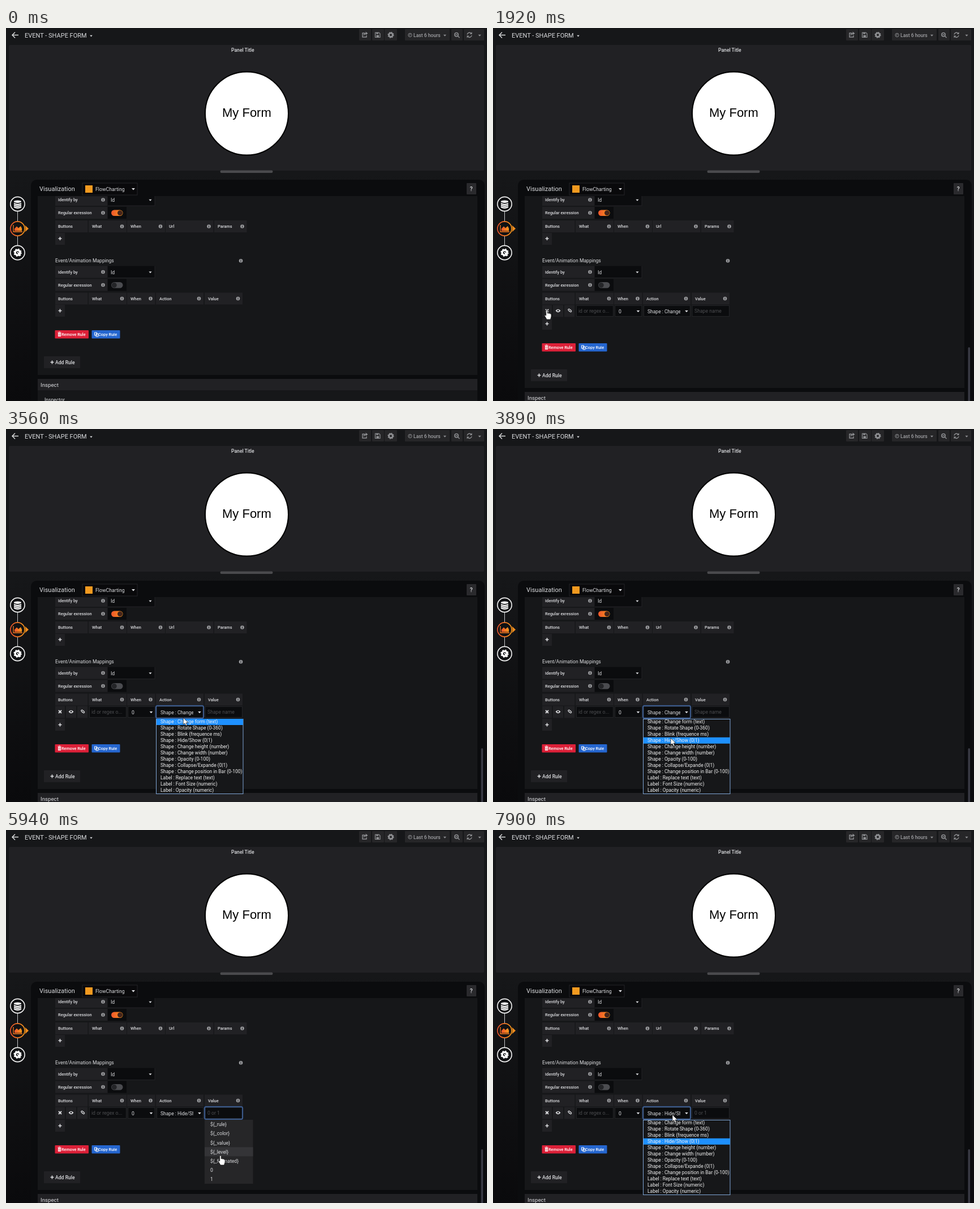
Write an HTML page that moves like this. It is 850 px wide and 659 px high and loops after 8000 ms.

```html
<!DOCTYPE html>
<html lang="en">
<head>
<meta charset="utf-8">
<title>Event mapping editor</title>
<style>
html, body { margin: 0; width: 100%; height: 100%; overflow: hidden; background: #161719; }
svg { display: block; width: 850px; height: 659px; font-family: Roboto, sans-serif; }
</style>
</head>
<body>
<svg id="stage" viewBox="0 0 850 659"></svg>
<script>
const LOOP = 8000, ROW_HEIGHT = 23;
const CELL = '#212124', DARK = '#0b0c0e', BODY = '#161719', TEXT = '#dcdde0', MUTED = '#8e8f92';
const stage = document.getElementById('stage');

// Drawing helpers: each returns markup; text is centred vertically on y.
const rect = (x, y, w, h, fill, extra = '') =>
  `<rect x="${x}" y="${y}" width="${w}" height="${h}" fill="${fill}" ${extra}/>`;
const path = (d, fill, extra = '') => `<path d="${d}" fill="${fill}" ${extra}/>`;
const line = (d, stroke, width = 1) => path(d, 'none', `stroke="${stroke}" stroke-width="${width}"`);
const circle = (x, y, r, fill, extra = '') => `<circle cx="${x}" cy="${y}" r="${r}" fill="${fill}" ${extra}/>`;
const text = (x, y, str, size = 8.66, fill = TEXT, extra = '') =>
  `<text x="${x}" y="${y + size * 0.355}" font-size="${size}" fill="${fill}" ${extra}>${str}</text>`;
const bold = (x, y, str, size = 7.45, fill = TEXT) => text(x, y, str, size, fill, 'font-weight="500"');
const group = (id, content, extra = '') => `<g id="${id}" ${extra}>${content}</g>`;
const at = (x, y, content) => `<g transform="translate(${x} ${y})">${content}</g>`;

const caret = (x, y, size = 2.6, fill = TEXT) =>
  path(`M${x - size} ${y - size / 2}h${2 * size}l${-size} ${size * 1.15}z`, fill);
const info = (x, y) => circle(x, y, 3.3, '#9a9b9e') + line(`M${x} ${y - 2}v1.1M${x} ${y - 0.4}v2.3`, '#1b1b1d', 1.1);
const plus = (x, y, fill = TEXT) => line(`M${x - 3} ${y}h6M${x} ${y - 3}v6`, fill, 1.6);
const gear = (x, y, r, fill) => circle(x, y, r * 0.62, 'none', `stroke="${fill}" stroke-width="${r * 0.5}"`) +
  circle(x, y, r * 0.88, 'none', `stroke="${fill}" stroke-width="${r * 0.28}" stroke-dasharray="${r * 0.3456}"`);

function columns(y, cols) {
  return cols.map(([name, x, w], i) => rect(x, y - 10.5, w, 21, CELL) +
    bold(x + (i ? 6 : 5), y, name) + (i ? info(x + w - 8, y) : '')).join('');
}

function options(y, on, top) {
  const h = y + 10.5 - top;
  return rect(87, top, 92, h, CELL) + bold(92, y, 'Identify by') + info(171.5, y) +
    rect(180, top, 83, h, DARK) + path(`M180 ${y + 10.5}h83V${top}`, 'none', 'stroke="#222326"') +
    text(185, y + 0.5, 'Id') + caret(255, y + 0.5) +
    rect(87, y + 12.5, 92, 21, CELL) + bold(92, y + 23, 'Regular exression') + info(171.5, y + 23) +
    rect(180, y + 12.5, 33, 21, DARK) +
    rect(186, y + 18, 20.5, 10.5, on ? 'url(#orange)' : '#4b4c50', 'rx="5.2"') +
    circle(on ? 201.5 : 191.2, y + 23.2, 4.5, on ? '#44251b' : '#242528');
}

function toolbar() {
  const button = (x, w) => rect(x, 2, w, 20, '#262628', 'rx="1"');
  return line('M22 12.5H11M16 7.5l-5 5 5 5', '#d8d9da', 1.5) +
    text(33, 12.7, 'EVENT - SHAPE FORM', 11) + caret(150.5, 14, 2.3) +
    [[624, 21], [647, 21], [669, 22], [705, 79], [787, 20], [809, 36]].map(b => button(...b)).join('') +
    line('M634 9h-4v7h7v-3M632.5 13q0-3.500 5-3.500', MUTED, 1.4) + path('M635.500 6.500l4 3-4 3z', MUTED) +
    path('M652.500 8h6.500l2 2v6.500h-8.500z', 'none', `stroke="${MUTED}" stroke-width="1.200"`) +
    rect(654, 8, 4, 2.5, MUTED) + rect(654.5, 12.5, 4.5, 3.5, MUTED) + gear(680, 12.3, 5.5, MUTED) +
    circle(714, 12.5, 3.2, 'none', `stroke="${MUTED}"`) + line('M714 10.500v2.300h-1.600', MUTED) +
    bold(720, 12.7, 'Last 6 hours', 8.6, '#a0a1a4') + caret(775.5, 13, 2.6, MUTED) +
    circle(796, 11.8, 3.2, 'none', `stroke="${MUTED}" stroke-width="1.500"`) +
    line('M798.500 14.300l3 3M794.500 11.800h3', MUTED, 1.4) +
    line('M815 11.500a4 4 0 0 1 7-2M823 13a4 4 0 0 1-7 2', MUTED, 1.5) +
    path('M823.500 7v4h-4zM814.500 17.500v-4h4z', MUTED) + caret(837, 13, 2.6, MUTED);
}

function sideTabs() {
  const ring = (y, color) => circle(20.5, y, 12.6, '#111214', `stroke="${color}" stroke-width="1.600"`);
  const disc = y => path(`M14 ${y}q6.500 3.500 13 0v2.200q-6.500 3.600-13 0z`, '#fff');
  return line('M20.500 323v62', '#c8c9cb') + ring(311, '#f4f4f4') + ring(354.5, 'url(#orange)') + ring(397, '#f4f4f4') +
    `<ellipse cx="20.5" cy="306.700" rx="6.500" ry="2.300" fill="#fff"/>` + disc(309) + disc(312) + disc(315) +
    path('M33.500 348.500l6.500 6-6.500 6q2-6 0-12z', '#f78f1e') +
    line('M13 348v12h16', '#f47a20', 1.3) + path('M15 358.500v-4l4-4 3 3 4-3.500 2 4v4.500z', 'url(#orange)') +
    gear(20.5, 396.8, 7, '#fff') + line('M20 396l6 6', '#fff', 2);
}

function actionRow() {
  const field = (x, w) => rect(x + 0.5, 490.5, w - 1, 19, DARK, 'stroke="#232427"');
  return [[87, 17], [106, 18], [126, 18]].map(([x, w]) => rect(x, 489.5, w, 21, CELL)).join('') +
    line('M93 497l5 5M98 497l-5 5', TEXT, 1.8) +
    path('M110.500 499.500q4.500-5.500 9 0-4.500 5.500-9 0z', TEXT) + circle(115, 499.3, 1.5, CELL) +
    line('M135 500.500l-2-2a1.500 1.500 0 0 1 2-2l2 2M134.500 499.500l2 2a1.500 1.500 0 0 0 2-2l-1.500-1.500', TEXT, 1.2) +
    field(147, 66) + field(215, 48.5) + field(266, 83) + field(351.5, 66.5) +
    text(151, 500, 'id or regex o...', 8.66, '#4c4d50') + text(222, 500.5, '0') +
    caret(256.5, 500.5, 2.8) + caret(342, 500.5, 2.8) +
    `<g clip-path="url(#selectClip)">${text(273, 500.7, '', 8.5, TEXT, 'id="action"')}</g>` +
    text(356, 500, '', 8.66, '#4c4d50', 'id="placeholder"');
}

function lowerPart() {
  return rect(87, 489, 17, 21, CELL) + plus(95.5, 499.5) +
    rect(86.5, 534, 59.5, 14.5, '#dc2038', 'rx="1"') + rect(92, 539, 5, 6, '#fff') +
    line('M91.500 538h6M93.500 537h2', '#fff') + line('M93.500 540v4M95.500 540v4', '#dc2038', 0.7) +
    bold(98, 541.3, 'Remove Rule', 7.3, '#fff') +
    rect(151.5, 534, 50, 14.5, '#2566cf', 'rx="1"') +
    path('M156.500 538h4v5h-4zM159 540h4v5h-4z', '#2566cf', 'stroke="#fff"') + bold(163, 541.3, 'Copy Rule', 7.4, '#fff') +
    rect(67, 580, 64, 21, CELL, 'rx="1"') + plus(81.5, 590.5) + bold(87, 590.8, 'Add Rule', 8.65) +
    rect(56, 613, 777, 7, DARK) + rect(56, 620, 777, 20, CELL) + text(61, 630.3, 'Inspect', 9.7) +
    text(68, 656.5, 'Inspector', 8.6);
}

const ACTIONS = ['Shape : Change form (text)', 'Shape : Rotate Shape (0-360)', 'Shape : Blink (frequence ms)',
  'Shape : Hide/Show (0|1)', 'Shape : Change height (number)', 'Shape : Change width (number)',
  'Shape : Opacity (0-100)', 'Shape : Collapse/Expande (0|1)', 'Shape : Change position in Bar (0-100)',
  'Label : Replace text (text)', 'Label : Font Size (numeric)', 'Label : Opacity (numeric)'];
const VALUES = ['${_rule}', '${_color}', '${_value}', '${_level}', '${_formated}', '0', '1'];
const ACTION_STEP = 10.93, VALUE_STEP = 16.1;

const menu = () => rect(265.5, 512.5, 153.5, 132, BODY, 'stroke="#7fa6d6"') +
  rect(266, 512, 153, 11, '#1e90ff', 'id="menuHover"') +
  ACTIONS.map((s, i) => text(273, 517.3 + i * ACTION_STEP, s, 8.5, '#f2f2f2')).join('');
const suggestions = () => rect(351, 512, 85.5, 113, '#262628') +
  rect(351, 512, 85.5, 16.1, '#343437', 'id="listHover"') +
  VALUES.map((s, i) => text(361, 520.3 + i * VALUE_STEP, s)).join('');
const focusRing = (id, x, w) => group(id,
  rect(x, 489, w, 22, 'none', 'rx="2" stroke="#1d3f78" stroke-width="2.500" opacity=".6"') +
  rect(x, 489, w, 22, 'none', 'rx="2" stroke="#5c83bd"'));

const cursors = () =>
  group('arrow', path('M0 0V12.200L2.800 9.700 4.800 14.200 6.900 13.300 5 8.900H8.800Z', '#fff', 'stroke="#111" stroke-width=".7"')) +
  group('hand', path('M-1.300 .8Q0-.8 1.300 .8V6Q3 5 4 6.300 5.700 5.500 6.400 7 8 6.600 8 8.500V12L6.500 17H0L-3.700 10.500Q-3.500 8.500-1.300 10Z',
    '#fff', 'stroke="#111" stroke-width=".8"')) +
  group('beam', line('M-.5-6.500q3 0 3 2 0-2 3-2M2.500-5v12M-.5 8.500q3 0 3-2 0 2 3 2', '#e8e8e8', 1.2));

stage.innerHTML = `<defs>
  <linearGradient id="orange"><stop stop-color="#f0552c"/><stop offset="1" stop-color="#fb9a1c"/></linearGradient>
  <linearGradient id="fade" x2="0" y2="1"><stop stop-color="#161719"/><stop offset="1" stop-color="#0a0a0c"/></linearGradient>
  <clipPath id="selectClip"><rect x="266" y="489" width="65" height="22"/></clipPath></defs>` +
  rect(0, 0, 850, 659, BODY) + rect(0, 260, 850, 399, 'url(#fade)') + toolbar() +
  rect(5, 30, 840, 222, CELL, 'rx="2"') + bold(398, 39, 'Panel Title', 8.6) +
  circle(425.5, 151, 73.5, '#fff', 'stroke="#000" stroke-width="2"') +
  text(382, 149.5, 'My Form', 22, '#000', 'font-family="Liberation Sans, sans-serif"') +
  rect(378.5, 251.5, 93, 4.5, '#4a4a4d', 'rx="2.200"') +
  rect(44, 268, 802, 410, DARK, 'rx="10"') + sideTabs() +
  text(59, 283.7, 'Visualization', 11) + rect(135, 274, 97, 21, '#09090b', 'stroke="#242528"') +
  rect(140, 278, 13, 13, '#f29a1f') + text(158, 284.7, 'FlowCharting', 8.75) + caret(225, 284.5, 3) +
  rect(814, 274, 17, 20, '#2a2a2d', 'rx="1"') + bold(819.7, 284.5, '?', 10) +
  rect(56, 297, 777, 362, BODY) + options(303.5, true, 297) +
  columns(350.5, [['Buttons', 87, 57.5], ['What', 146, 67], ['When', 214, 67], ['Url', 282, 84.5], ['Params', 368, 57.5]]) +
  rect(87, 362, 17, 21, CELL) + plus(95.5, 372) +
  text(87, 411.3, 'Event/Animation Mappings', 8.6) + info(415, 411.3) + options(431, false, 420.5) +
  columns(478, [['Buttons', 87, 57.5], ['What', 146, 67], ['When', 214, 49.5], ['Action', 265, 84], ['Value', 351, 67]]) +
  group('row', actionRow()) + group('lower', lowerPart()) +
  rect(839.5, 564, 3.5, 96, '#393a44', 'id="scrollbar" rx="1.700"') +
  focusRing('actionFocus', 265, 84) + focusRing('valueFocus', 351, 67) +
  group('textCaret', line('M356.500 495v10', '#e0e0e0')) +
  group('tooltip', rect(422, 491, 118, 17, '#000', 'rx="1.500"') + path('M422 496.500l-3.500 3 3.500 3z', '#000') +
    bold(427, 499.6, 'Specify value for this action', 8.6)) +
  group('menu', menu()) + group('list', suggestions()) +
  group('pointer', circle(0, 0, 9.5, '#f0dc00', 'id="click" opacity=".68"') + cursors());

const parts = {};
stage.querySelectorAll('[id]').forEach(el => parts[el.id] = el);

// Pointer moves: start, end, number of steps, then evenly timed waypoints.
const ORIGIN = [370, 650];
const MOVES = [
  [100, 850, 8, [270, 600], [185, 550], [120, 512], [92, 497]],
  [1380, 1590, 3, [95, 498]],
  [2270, 3020, 8, [190, 540], [276, 554], [316, 512], [313, 498]],
  [3560, 3890, 4, [314, 546]],
  [4100, 4850, 8, [314, 546], [330, 535], [365, 515], [390.5, 505]],
  [5510, 6260, 8, [385, 530], [380, 560], [378, 590], [376, 615]],
  [6370, 7130, 8, [378, 590], [380, 555], [380, 523], [322, 490]],
  [7240, 7570, 4, [345, 498], [300, 500], [270, 501], [317, 503]]
];

function pointerAt(t) {
  let from = ORIGIN;
  for (const [start, end, steps, ...stops] of MOVES) {
    if (t < start) break;
    const route = [from, ...stops];
    from = stops[stops.length - 1];
    if (t >= end) continue;
    const step = Math.floor((t - start) / (end - start) * (steps - 1) + 0.2) + 1;
    const p = Math.min(1, step / steps) * stops.length, i = Math.min(stops.length - 1, Math.floor(p));
    return route[i].map((v, axis) => v + (route[i + 1][axis] - v) * (p - i));
  }
  return from;
}

const show = (id, on) => parts[id].setAttribute('display', on ? 'inline' : 'none');
const hoverRow = (y, step, count) => Math.max(0, Math.min(count - 1, Math.floor((y - 512) / step)));

function draw(t) {
  const within = (...spans) => spans.some(([a, b]) => t >= a && t < b);
  const [x, y] = pointerAt(t);
  const changed = t >= 4200, listOpen = within([5070, 7900]);

  show('scrollbar', t >= 100);
  show('row', t >= 1810);
  parts.lower.setAttribute('transform', `translate(0 ${t >= 1810 ? ROW_HEIGHT : 0})`);
  parts.action.textContent = ACTIONS[changed ? 3 : 0];
  parts.placeholder.textContent = changed ? '0 or 1' : 'Shape name';

  show('actionFocus', within([2910, 4970], [7790, LOOP]));
  show('valueFocus', within([4970, 7790]));
  show('textCaret', within([4970, 5510]));
  show('tooltip', within([4740, 5620]));
  show('menu', within([3020, 4200], [7900, LOOP]));
  show('list', listOpen);
  const menuRow = t >= 7900 ? 3 : hoverRow(y, ACTION_STEP, ACTIONS.length);
  parts.menuHover.setAttribute('y', 512 + menuRow * ACTION_STEP);
  parts.listHover.setAttribute('y', 512 + hoverRow(y, VALUE_STEP, VALUES.length) * VALUE_STEP);

  const hand = within([1380, 2270]) || (listOpen && y > 512);
  const beam = !hand && t > 4200 && x > 351 && x < 418 && y > 489 && y < 512;
  show('pointer', t >= 100);
  show('click', within([940, 1150], [2910, 3020], [4100, 4200], [4970, 5170], [7790, 7900]));
  show('hand', hand);
  show('beam', beam);
  show('arrow', !hand && !beam);
  parts.pointer.setAttribute('transform', `translate(${x} ${y})`);
}

const began = performance.now();
function tick() {
  draw((performance.now() - began) % LOOP);
  requestAnimationFrame(tick);
}
tick();
</script>
</body>
</html>
```
